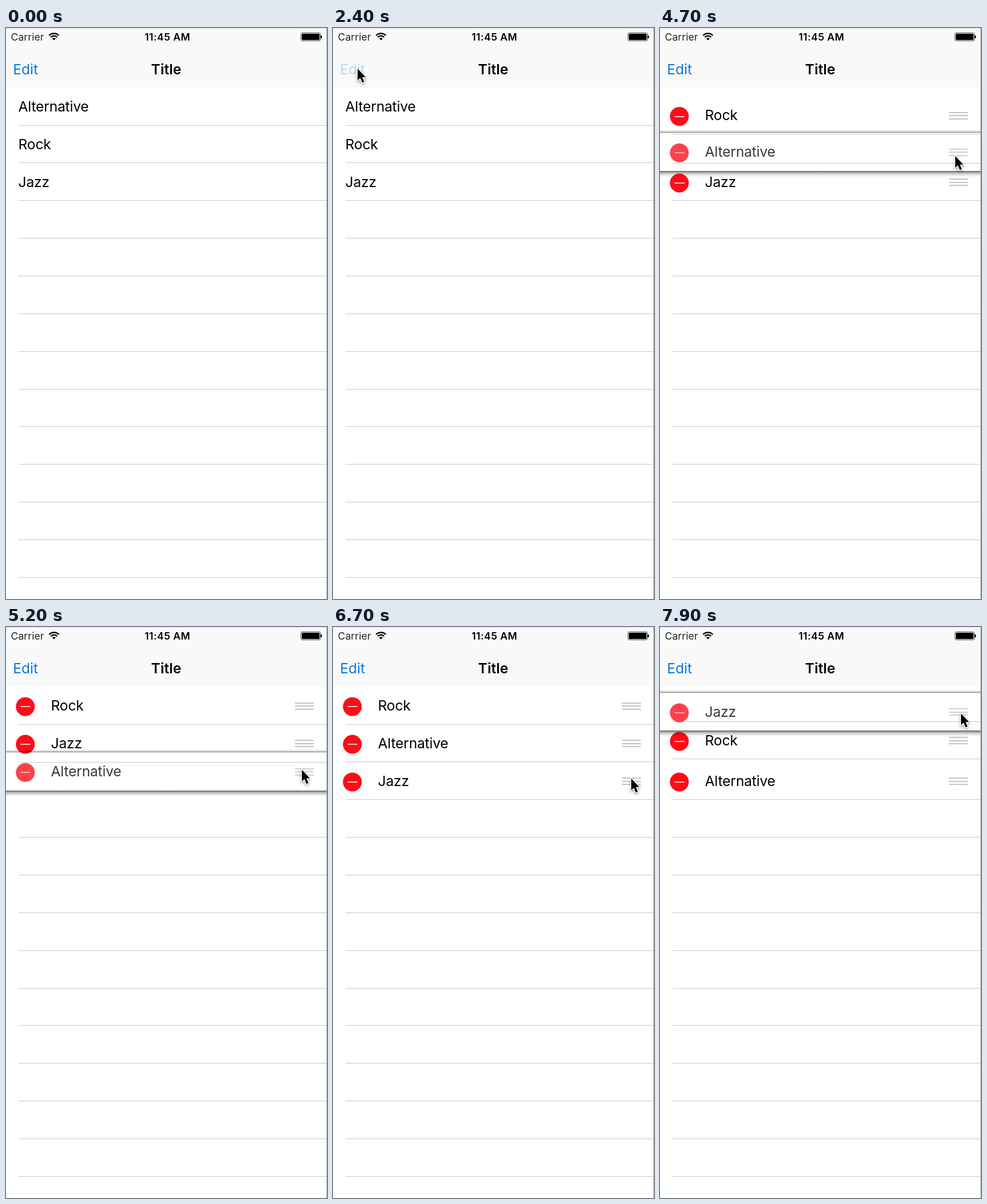
An HTML page with a canvas that plays this animation: 561x998 px, repeating every 8 s.

```html
<!DOCTYPE html>
<html lang="en">
<head>
<meta charset="utf-8">
<title>Reorderable list</title>
<style>
html, body { margin: 0; width: 100%; height: 100%; overflow: hidden; background: #fff; }
canvas { display: block; width: 561px; height: 998px; }
</style>
</head>
<body>
<canvas id="stage" width="561" height="998"></canvas>
<script>
const ctx = document.getElementById('stage').getContext('2d');
const W = 561, H = 998, LOOP = 8000, TICK = 100;
const TOP = 104.3, ROW = 65.85, GRAB_ALPHA = 0.78, LAG = 40;
const FONT = 'Inter, Roboto, sans-serif';

const clamp = v => Math.max(0, Math.min(1, v));
const ease = v => (1 - Math.cos(Math.PI * clamp(v))) / 2;

// A glide is { at, ms, x, y }: an eased shift that adds to the others.
const glide = (at, ms, x, y) => ({ at, ms, x, y });
const step = (at, slots) => glide(at, 250, 0, slots * ROW);
const total = (glides, t, axis) =>
  glides.reduce((sum, g) => sum + g[axis] * ease((t - g.at) / g.ms), 0);

const rows = [
  { text: 'Alternative', held: [4200, 6300],
    drag: [glide(4190, 760, 0, 116), glide(5100, 750, 0, -55.5)],
    steps: [glide(6300, 200, 0, ROW - 60.5), step(7460, 1)] },
  { text: 'Rock', drag: [], steps: [step(4530, -1), step(7695, 1)] },
  { text: 'Jazz', held: [7100, LOOP],
    drag: [glide(7180, 670, 0, -121)],
    steps: [step(4800, -1), step(5400, 1)] }
];

const pointerStart = { x: -14, y: 236 };
const pointerPath = [
  glide(0, 900, 141, -79),
  glide(900, 600, -89, -84),
  glide(1600, 200, 5, 7),
  glide(2300, 100, 0, -9),
  glide(3100, 700, 476, 65),
  glide(4200, 500, -3, 0),
  glide(5000, 800, 7, 0),
  glide(6300, 500, -2, 75.5),
  glide(7400, 500, 5, 0),
  ...rows.flatMap(row => row.drag)
];

function text(str, x, y, size, { weight = 400, color = '#000', align = 'left', spacing = 0 } = {}) {
  ctx.font = `${weight} ${size}px ${FONT}`;
  ctx.letterSpacing = spacing + 'px';
  ctx.textAlign = align;
  ctx.fillStyle = color;
  ctx.fillText(str, x, y);
}

function rect(x, y, w, h, color) {
  ctx.fillStyle = color;
  ctx.fillRect(x, y, w, h);
}

function faded(alpha, draw) {
  ctx.save();
  ctx.globalAlpha *= alpha;
  draw();
  ctx.restore();
}

function separator(y) {
  rect(22, Math.floor(y), W - 22, 1, '#c8c7cc');
}

function drawWifi() {
  const x = 83.8, y = 21.6, from = -Math.PI * 0.75, to = -Math.PI * 0.25;
  ctx.fillStyle = ctx.strokeStyle = '#0a0a0a';
  ctx.lineWidth = 2.5;
  for (const r of [7.8, 12]) {
    ctx.beginPath();
    ctx.arc(x, y, r, from, to);
    ctx.stroke();
  }
  ctx.beginPath();
  ctx.moveTo(x, y);
  ctx.arc(x, y, 4.4, from, to);
  ctx.fill();
}

function drawBattery() {
  ctx.strokeStyle = '#444';
  ctx.lineWidth = 1;
  ctx.beginPath();
  ctx.roundRect(515.5, 8.5, 34, 14, 2.5);
  ctx.stroke();
  ctx.fillStyle = '#000';
  ctx.beginPath();
  ctx.roundRect(517, 10, 31, 11, 1.5);
  ctx.roundRect(550, 13, 2, 5, [0, 1, 1, 0]);
  ctx.fill();
}

function drawBar(t) {
  rect(0, 0, W, 104, '#f9f9f9');
  rect(0, 0, W, 1, '#dedede');
  text('Carrier', 8.5, 22, 17.5, { color: '#222', spacing: 0.1 });
  drawWifi();
  text('11:45 AM', 282.2, 22, 17.5, { weight: 600, align: 'center', spacing: 0.5 });
  drawBattery();
  const edit = t < 2400 ? 1 : 0.25 + 0.75 * ease((t - 2500) / 400);
  faded(edit, () => text('Edit', 12.2, 81, 24.6, { color: '#0878df' }));
  text('Title', 280, 81, 24.6, { weight: 600, align: 'center', spacing: 0.1 });
}

function drawContent(label, y, editing) {
  text(label, 21.6 + 57 * editing, y + 41.7, 24.6, { spacing: -0.2 });
  faded(editing, () => {
    ctx.fillStyle = '#fd0d18';
    ctx.beginPath();
    ctx.arc(33.8, y + 34.9, 16.5, 0, Math.PI * 2);
    ctx.fill();
    rect(25.5, Math.round(y + 34), 17, 2, '#ffc4c4');
    for (let i = 0; i < 3; i++) rect(505, Math.round(y + 27.3 + 5.5 * i), 33, 2, '#c3c3c6');
  });
}

// Shadow band that thins out away from the row edge.
function shadow(edge, reach, alpha) {
  const g = ctx.createLinearGradient(0, edge, 0, edge + reach);
  for (let i = 0; i <= 4; i++) {
    g.addColorStop(i / 4, `rgba(0,0,0,${alpha * (1 - i / 4) ** 2})`);
  }
  rect(0, edge, W, reach, g);
}

// The lifted row is clear, so the lines below stay visible.
function drawLift(y, lift) {
  const top = Math.round(y), low = Math.round(y + ROW + 0.5);
  faded(lift, () => {
    shadow(top, -7, 0.3);
    shadow(low, 12, 0.55);
    rect(0, top - 1, W, 1, 'rgba(0,0,0,.3)');
    rect(0, low, W, 1, 'rgba(0,0,0,.3)');
  });
}

function drawPointer(x, y) {
  const arrow = new Path2D('M0 0V20.5L4.6 16.2L8.1 24.6L11.6 23.1L8.1 15H14.2Z');
  ctx.save();
  ctx.translate(x, y);
  ctx.lineJoin = 'round';
  ctx.lineWidth = 2.8;
  ctx.strokeStyle = '#fff';
  ctx.shadowColor = 'rgba(0,0,0,.4)';
  ctx.shadowBlur = 4;
  ctx.shadowOffsetY = 2;
  ctx.stroke(arrow);
  ctx.shadowColor = 'transparent';
  ctx.fillStyle = '#000';
  ctx.fill(arrow);
  ctx.restore();
}

function liftAt({ held }, t) {
  if (!held || t < held[0]) return 0;
  return Math.min(ease((t - held[0] + TICK) / 200), 1 - ease((t - held[1]) / 200));
}

function draw(t) {
  const editing = ease((t - 2500) / 400);
  const cells = rows.map((row, i) => {
    const y = TOP + i * ROW + total(row.steps, t, 'y') + total(row.drag, t - LAG, 'y');
    return { label: row.text, y, lift: liftAt(row, t), slot: Math.round((y - TOP) / ROW) };
  });
  const resting = cells.filter(c => c.lift === 0);
  const grabbed = cells.find(c => c.lift > 0);

  rect(0, 0, W, H, '#fff');
  // A row below the gap also shows its top line.
  for (const c of resting) {
    drawContent(c.label, c.y, editing);
    separator(c.y + ROW);
    if (c.slot > 0 && !resting.some(o => o.slot === c.slot - 1)) separator(c.y);
  }
  for (let k = 4; k <= 13; k++) separator(TOP + k * ROW);

  if (grabbed) {
    drawLift(grabbed.y, grabbed.lift);
    faded(1 - (1 - GRAB_ALPHA) * grabbed.lift, () => drawContent(grabbed.label, grabbed.y, editing));
  }
  drawBar(t);
  rect(W - 1, 0, 1, H, '#a2a2a2');
  if (t > 0) {
    drawPointer(pointerStart.x + total(pointerPath, t, 'x'), pointerStart.y + total(pointerPath, t, 'y'));
  }
}

const start = performance.now();
function frame() {
  const t = (performance.now() - start) % LOOP;
  draw(Math.floor(t / TICK) * TICK);
  requestAnimationFrame(frame);
}
frame();
</script>
</body>
</html>
```
